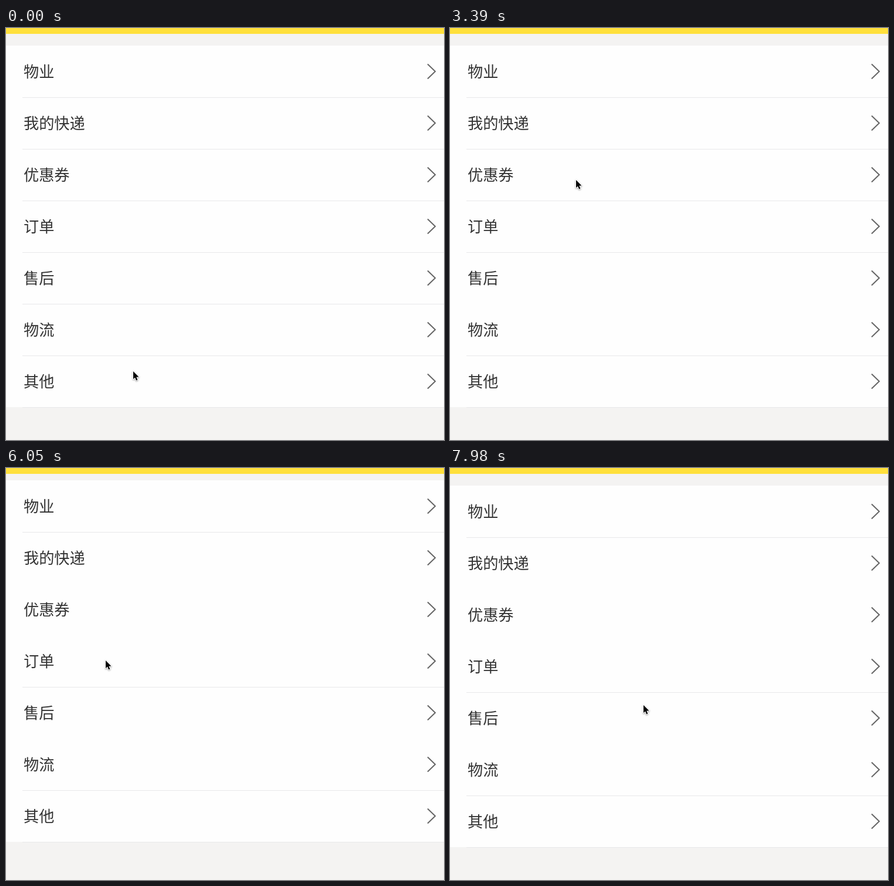
Recreate the animation shown at these times as an HTML page with a canvas. Size 747 by 702 pixels, loop 8 s.

```html
<!DOCTYPE html>
<html lang="zh-CN">
<head>
<meta charset="utf-8">
<style>
  html, body { margin: 0; width: 100%; height: 100%; overflow: hidden; background: #f4f3f2; }
  canvas { display: block; }
</style>
</head>
<body>
<canvas id="stage" width="747" height="702"></canvas>
<script>
const W = 747, H = 702, LOOP = 8000;
const STEP = 148, LEAD = 18;          // the picture advances in held steps
const TOP = 30, ROW = 88;
const labels = ['物业', '我的快递', '优惠券', '订单', '售后', '物流', '其他'];
const ctx = document.getElementById('stage').getContext('2d');

const smooth = p => p * p * (3 - 2 * p);
const rubber = p => Math.sin(p * Math.PI / 2);

// Each move runs from one step to another and ends at the given place.
const pointerMoves = [
  { from: 1, to: 2, at: [213, 583] },
  { from: 3, to: 8, at: [198, 573] },
  { from: 10, to: 12, at: [202, 503] },
  { from: 15, to: 17, at: [206, 478] },
  { from: 19, to: 23, at: [215, 259] },
  { from: 27, to: 28, at: [216, 267] },
  { from: 28, to: 35, at: [170, 366] },
  { from: 38, to: 41, at: [170, 328] },
  { from: 42, to: 45, at: [164, 98] },
  { from: 48, to: 49, at: [164, 106] },
  { from: 49, to: 54, at: [330, 404] }
];

// The list is pulled off its place, then springs back over three steps.
const pull = (from, to, y) => ({ from, to, at: [y] });
const spring = from => pull(from, from + 3, 0);
const listMoves = [
  pull(16, 17, -1), pull(19, 20, -5), spring(20),
  pull(28, 30, 10), spring(30),
  pull(38, 42, -10), spring(42),
  pull(49, 51, 14), spring(51)
];

const presses = [
  { row: 5, from: 14, to: 16 },
  { row: 2, from: 26, to: 28 },
  { row: 3, from: 36, to: 39 },
  { row: 0, from: 47, to: 49 }
];

function follow(moves, origin, n, ease) {
  return moves.reduce((place, { from, to, at }) => {
    const p = ease(Math.min(1, Math.max(0, (n - from) / (to - from))));
    return place.map((v, i) => v + (at[i] - v) * p);
  }, origin).map(Math.round);
}

function fill(color, x, y, w, h) {
  ctx.fillStyle = color;
  ctx.fillRect(x, y, w, h);
}

function path(points) {
  ctx.beginPath();
  points.forEach(([x, y]) => ctx.lineTo(x, y));
}

function drawRow(label, y) {
  ctx.fillStyle = '#333';
  ctx.fillText(label, 30, y + 54);
  path([[719, y + 31.5], [732, y + 44], [719, y + 56.5]]);
  ctx.strokeStyle = '#666';
  ctx.lineWidth = 2;
  ctx.lineJoin = 'miter';
  ctx.stroke();
}

function drawList(n, top) {
  fill('#fefefe', 0, top, W, ROW * labels.length);
  // A pressed row loses the separator above it for good.
  const lost = presses.filter(p => n >= p.from).map(p => p.row - 1);
  labels.forEach((_, i) => {
    if (!lost.includes(i)) fill('#e8e8ea', 28, top + ROW * (i + 1), W - 28, 1);
  });
  const held = presses.find(p => n >= p.from && n < p.to);
  if (held) fill('#d8d8d8', 0, top + ROW * held.row - 1, W, ROW + 2);
  labels.forEach((label, i) => drawRow(label, top + ROW * i));
}

function drawPointer(x, y) {
  ctx.save();
  ctx.translate(x, y);
  path([[0, 0], [0, 13.2], [3, 10.5], [5.1, 15.4], [7.4, 14.5], [5.3, 9.7], [9.5, 9.5]]);
  ctx.closePath();
  ctx.lineJoin = 'round';
  ctx.lineWidth = 2;
  ctx.strokeStyle = '#fff';
  ctx.shadowColor = 'rgba(0,0,0,0.4)';
  ctx.shadowBlur = 2.5;
  ctx.shadowOffsetY = 1;
  ctx.stroke();
  ctx.shadowColor = 'transparent';
  ctx.fillStyle = '#000';
  ctx.fill();
  ctx.restore();
}

function draw(time) {
  const n = Math.floor((time % LOOP + LEAD) / STEP);
  const [offset] = follow(listMoves, [0], n, rubber);
  const [x, y] = follow(pointerMoves, [217, 585], n, smooth);
  ctx.font = '26.2px "Noto Sans CJK SC", "Noto Sans CJK", sans-serif';
  fill('#f4f3f2', 0, 0, W, H);
  drawList(n, TOP + offset);
  fill('#ffe03c', 0, 0, W, 10);
  drawPointer(x, y);
}

const start = performance.now();
function tick() {
  draw(performance.now() - start);
  requestAnimationFrame(tick);
}
tick();
</script>
</body>
</html>
```
